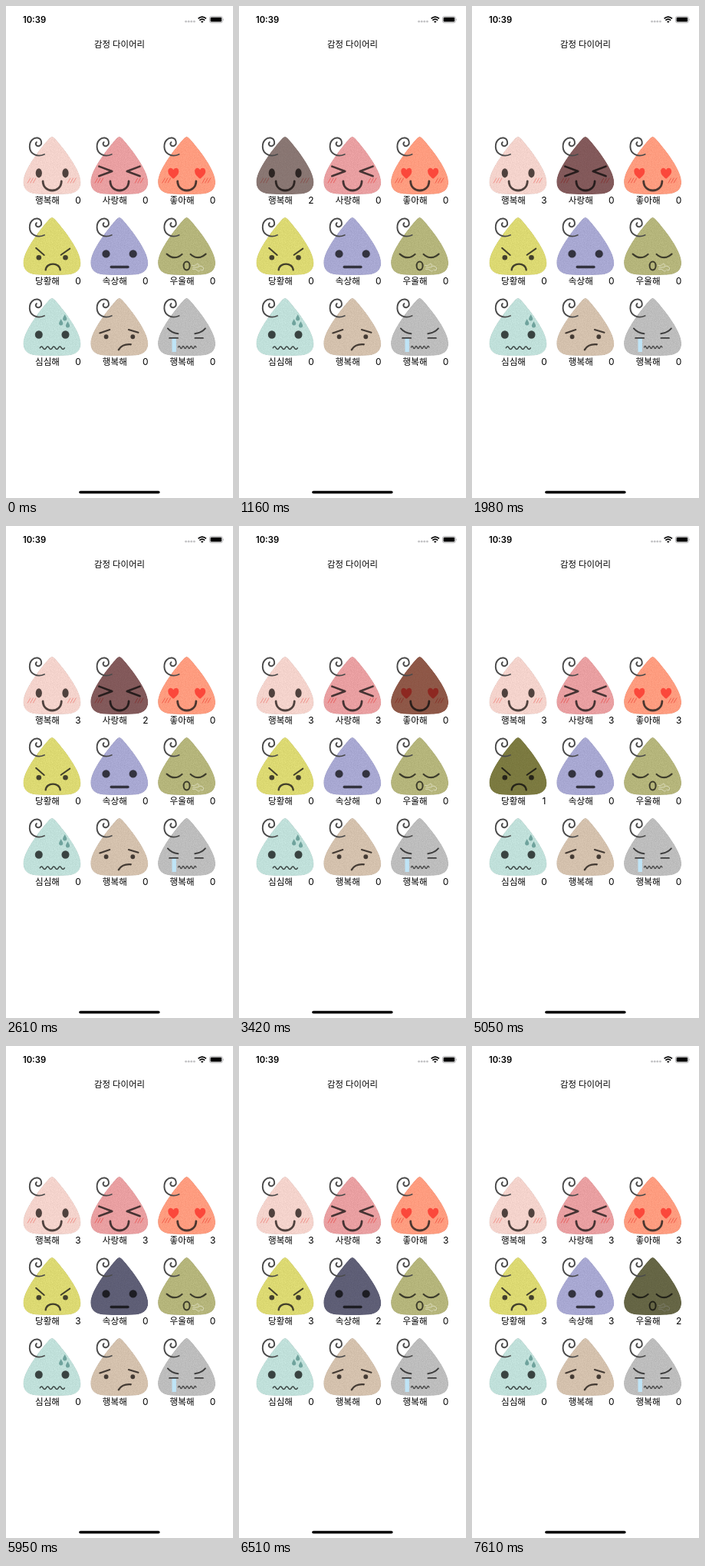
An HTML page for the animation above (8 s loop, 296 by 640 pixels).

```html
<!DOCTYPE html>
<html lang="ko">
<head>
<meta charset="utf-8">
<title>감정 다이어리</title>
<style>
html, body { margin: 0; width: 100%; height: 100%; overflow: hidden; background: #fff; }
svg { display: block; width: 100%; height: 100%; }
text { font-family: Inter, "Noto Sans CJK KR", "Noto Sans CJK", sans-serif; fill: #000; text-anchor: middle; }
.ko { font-family: "Noto Sans CJK KR", "Noto Sans CJK", "Noto Sans CJK JP", sans-serif; font-size: 11.6px; }
.title { font-size: 11.4px; font-weight: 500; }
.num { font-size: 12px; }
.line { fill: none; stroke-linecap: round; stroke-linejoin: round; }
.pressed { filter: brightness(.56); }
</style>
</head>
<body>
<svg id="stage" viewBox="0 0 296 640">
  <defs>
    <filter id="grain" x="0" y="0" width="1" height="1" color-interpolation-filters="sRGB">
      <feTurbulence type="fractalNoise" baseFrequency=".8" numOctaves="2" seed="4"/>
      <feColorMatrix values="1 0 0 0 0  1 0 0 0 0  1 0 0 0 0  0 0 0 0 1" result="noise"/>
      <feComposite in="SourceGraphic" in2="noise" operator="arithmetic" k2="1" k3=".12" k4="-.06"/>
      <feComposite in2="SourceAlpha" operator="in"/>
    </filter>
  </defs>
  <rect width="296" height="640" fill="#fff"/>
  <text x="37" y="22" font-size="11.3" font-weight="600">10:39</text>
  <g fill="#c4c4c6">
    <circle cx="234.6" cy="20.2" r="1.4"/><circle cx="238.2" cy="20.2" r="1.4"/>
    <circle cx="241.8" cy="20.2" r="1.4"/><circle cx="245.4" cy="20.2" r="1.4"/>
  </g>
  <g fill="none" stroke="#000" stroke-width="1.7">
    <path d="M250.6 16.4Q255.8 11.8 261 16.4M252.4 18.6Q255.8 15.6 259.2 18.6"/>
    <path d="M254 20.1Q255.8 18.7 257.6 20.1L255.8 22Z" fill="#000" stroke="none"/>
  </g>
  <rect x="265.4" y="13.6" width="17" height="8.2" rx="2.4" fill="none" stroke="#a4a4a6" stroke-width=".8"/>
  <rect x="266.6" y="14.8" width="14.6" height="5.8" rx="1.3"/>
  <path d="M283.4 16.2Q284.8 17.7 283.4 19.2Z" fill="#a4a4a6"/>
  <text class="ko title" x="148" y="54">감정 다이어리</text>
  <g id="grid"></g>
  <rect x="95.2" y="630.8" width="105.4" height="3.4" rx="1.7"/>
</svg>
<script>
const LOOP = 8000;
const DROP = 'M37.5 0Q39.2 0 41 2C52.4 14.4 75 43 75 59C75 69.5 68 74.6 54 74.8Q37.5 75.2 21 74.8C7 74.6 0 69.5 0 59C0 43 22.6 14.4 34 2Q35.8 0 37.5 0Z';
const CURL = 'M27.5 23C18 27.2 8.7 22.4 8.3 13.4C8 5.4 13.5 .9 18.5 1.5C24.4 2.4 25.3 10.4 20.8 12C16.9 13.1 15 9.2 17.4 7.1';
const SMILE = 'M25.6 58C26 74 49.4 74 49.8 58';

const line = (d, color, width = 2.6) =>
  `<path class="line" d="${d}" stroke="${color}" stroke-width="${width}"/>`;
const oval = (x, y, rx, ry, color) =>
  `<ellipse cx="${x}" cy="${y}" rx="${rx}" ry="${ry}" fill="${color}"/>`;
const eyes = (y, rx, ry, color, left = 20.3, right = 55) =>
  oval(left, y, rx, ry, color) + oval(right, y, rx, ry, color);
const hatch = (x, color) =>
  line([0, 3.6, 7.2].map(dx => `M${x + dx} 60l3.4 -6`).join(''), color, .8);
const blush = color => hatch(5.8, color) + hatch(58, color);
const heart = (x, y) =>
  `<path transform="translate(${x} ${y})" fill="#fb483b" d="M0 7.5C-5 3.5 -7 1 -7 -2.6C-7 -7.4 -1.5 -8 0 -4C1.5 -8 7 -7.4 7 -2.6C7 1 5 3.5 0 7.5Z"/>`;
const bead = (x, y) =>
  `<path transform="translate(${x} ${y})" fill="#6fa39d" d="M0 -4.2Q2.6 0 2.6 1.4A2.6 2.6 0 0 1 -2.6 1.4Q-2.6 0 0 -4.2Z"/>`;
const wave = (x, y, step, count) =>
  `M${x} ${y}q${step / 2} -3.4 ${step} 0` + `t${step} 0`.repeat(count - 1);

const moods = [
  { name: '행복해', color: '#f4d3cc',
    face: eyes(47.3, 4.1, 6.1, '#50423e') + line(SMILE, '#50423e', 2.8) + blush('#ef7f78'),
    taps: [500, 800, 1160, 1980] },
  { name: '사랑해', color: '#e99fa1',
    face: line('M11 38.6L28 45L11 51.2M64.3 38.6L47.4 45L64.3 51.2', '#463333') +
      line(SMILE, '#463333', 2.8) + blush('#e9504e'),
    taps: [1980, 2290, 2610, 3420] },
  { name: '좋아해', color: '#ff9c7f',
    face: heart(20.2, 47.3) + heart(55, 47.3) + line(SMILE, '#4c3730', 2.8) + blush('#ef4c3d'),
    taps: [3420, 3650, 3920, 4780] },
  { name: '당황해', color: '#dcd972',
    face: line('M16.6 39.8L27.2 49M60.8 40.6L49.2 48.8', '#43402c', 2) +
      eyes(52.2, 3.3, 3.3, '#43402c') + line('M29.2 68.4C30.2 58 47.2 58 48.2 68.4', '#43402c', 2.4) },
  { name: '속상해', color: '#a8a8d2',
    face: eyes(47.4, 5.1, 5.2, '#33333f', 20.2, 55.4) + line('M27 64.5H48.6', '#33333f', 3.6),
    taps: [5950, 6090, 6510, 7190], lifted: [6090, 6230] },
  { name: '우울해', color: '#b5b57b',
    face: line('M11.6 47.6Q21.4 56.6 31.4 48M42.6 48Q52.6 56.6 62.4 47.6', '#3d3c2b', 2.2) +
      '<ellipse cx="37.5" cy="63" rx="4" ry="5.4" fill="none" stroke="#3d3c2b" stroke-width="2"/>' +
      line('M44.6 62.4q3 1 5 -.6q1 -2.4 3 -1.2q2 1.2 .2 2.8M46 65h6q3 -3 5.8 -1.2q3 2 1.2 4.6q-2 1.4 -3.4 -.2M45.4 67.2q4 -.6 6 1.8q1.2 2 3 .6', '#dfdfc2', .9),
    taps: [7190, 7430, 7610] },
  { name: '심심해', color: '#c0e0da',
    face: eyes(47.5, 5, 5.3, '#394341') + line(wave(21.8, 64.8, 4, 8), '#394341', 1.5) +
      bead(54.2, 25.4) + bead(49.2, 31.4) + bead(58, 34.4) },
  { name: '행복해', color: '#d4c1ad',
    face: line('M12 45.4L25 41M49.6 41L62.2 44.8', '#443b34', 2.1) +
      eyes(50.3, 2.9, 3, '#443b34') + line('M36.6 67.2C40 61 45 59.6 52.4 60.2', '#443b34', 2.4) },
  { name: '행복해', color: '#bdbdbd',
    face: '<path d="M18.4 52h5.4v18h-5.4z" fill="#bfe4f6"/>' +
      line('M12.8 39.4Q18 45.6 26.4 46.2M61.8 39.4Q56.6 45.6 48.2 46.2M15 51.9H26M48.4 51.9H58.8', '#3d3d3d', 1.9) +
      line(wave(26.4, 64, 2.6, 9), '#3d3d3d', 1.3) }
];
moods[3].taps = [4780, 5050, 5320, 5950];

const grid = document.getElementById('grid');
grid.innerHTML = moods.map((m, i) => `
  <g transform="translate(${22.5 + i % 3 * 87.8} ${170 + Math.floor(i / 3) * 105})">
    <g class="pic">
      <path d="${DROP}" fill="${m.color}" filter="url(#grain)"/>
      ${m.face}
    </g>
    ${line(CURL, '#4a4a4a', 1.9)}
    <text class="ko" x="31.5" y="86.6">${m.name}</text>
    <text class="num" x="71.5" y="86.8">0</text>
  </g>`).join('');

const pics = grid.querySelectorAll('.pic');
const nums = grid.querySelectorAll('.num');
const within = (t, from, to) => t >= from && t < to;

// The first tap time presses a picture; each later one adds to its count.
function draw(t) {
  moods.forEach((m, i) => {
    const [start = Infinity, ...hits] = m.taps || [];
    const end = hits[2] ?? Infinity;
    const lifted = m.lifted && within(t, ...m.lifted);
    pics[i].classList.toggle('pressed', within(t, start, end) && !lifted);
    const count = String(hits.filter(hit => t >= hit).length);
    if (nums[i].textContent !== count) nums[i].textContent = count;
  });
}

const origin = performance.now();
function tick() {
  draw((performance.now() - origin) % LOOP);
  requestAnimationFrame(tick);
}
tick();
</script>
</body>
</html>
```
